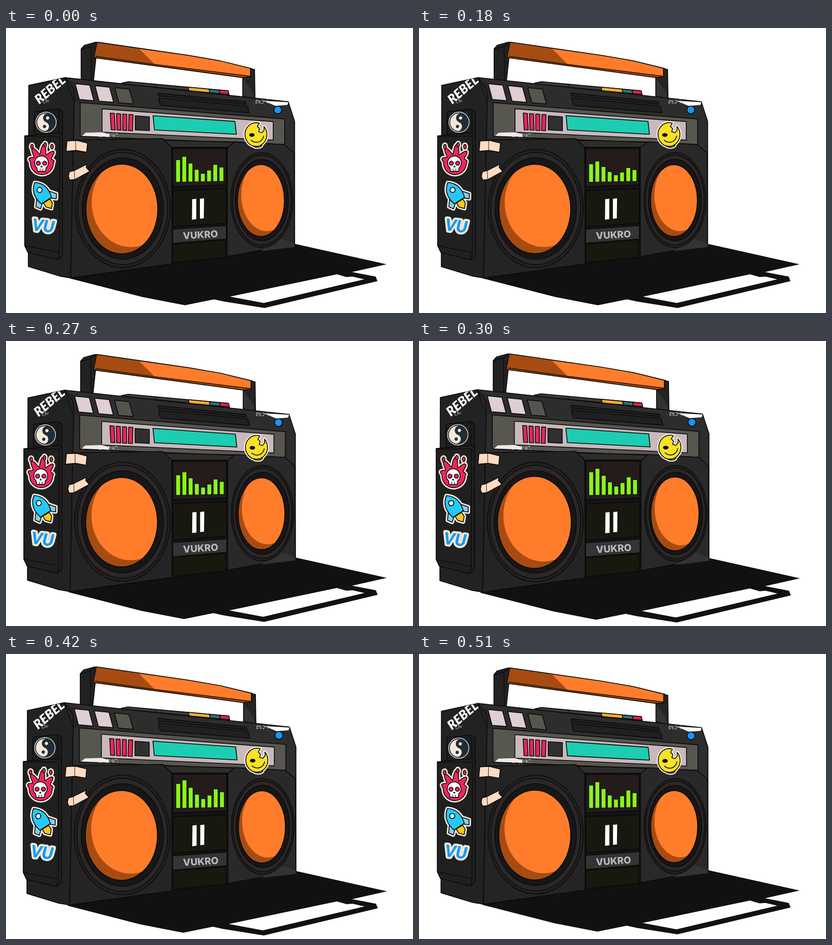
An HTML page with a canvas that plays this animation: 894x626 px, repeating every 540 ms.

```html
<!DOCTYPE html>
<html lang="en">
<head>
<meta charset="utf-8">
<title>Boombox</title>
<style>
html, body { margin: 0; width: 100%; height: 100%; overflow: hidden; background: #fff; }
canvas { display: block; }
</style>
</head>
<body>
<canvas id="stage" width="894" height="626"></canvas>
<script>
const ctx = document.getElementById('stage').getContext('2d');
const LOOP = 540, STEP = 30, TAU = Math.PI * 2;
const INK = '#0b0b0b', CREAM = '#f3e8d8', ORANGE = '#ff7c2b', RUST = '#a64c12', PINK = '#e7265a', TAPE = '#fddcc3';

// Motion: bell-shaped pulses over the loop.
const bell = (t, peak, width) => Math.exp(-(((t - peak) / width) ** 2));
const beat = t => bell(t, 345, t < 345 ? 80 : 125);
const conePulse = t => 1 - .015 * bell(t, 330, 110) + .03 * bell(t, 300, 20);
const barLevel = t => 1 + .13 * beat(t) - .28 * bell(t, 220, 65);

function paint(fill, stroke, width) {
  if (fill) { ctx.fillStyle = fill; ctx.fill(); }
  if (stroke) { ctx.strokeStyle = stroke; ctx.lineWidth = width; ctx.stroke(); }
}

function trace(p, close = true) {
  ctx.beginPath();
  for (let i = 0; i < p.length; i += 2) ctx.lineTo(p[i], p[i + 1]);
  if (close) ctx.closePath();
}

function poly(p, fill, stroke = INK, width = 1.8) {
  trace(p);
  paint(fill, stroke, width);
}

function line(p, width = 1.5) {
  trace(p, false);
  paint(null, INK, width);
}

function oval(x, y, rx, ry, fill, stroke, width = 1.8) {
  ctx.beginPath();
  ctx.ellipse(x, y, rx, ry, 0, 0, TAU);
  paint(fill, stroke, width);
}

function local(x, y, angle, draw, scale = 1) {
  ctx.save();
  ctx.translate(x, y);
  ctx.rotate(angle);
  ctx.scale(scale, scale);
  draw();
  ctx.restore();
}

function scaledAbout(x, y, scale, draw) {
  local(x, y, 0, () => { ctx.translate(-x, -y); draw(); }, scale);
}

function speckle(x, y, w, h, count, seed) {
  const rnd = () => (seed = seed * 16807 % 2147483647) / 2147483647;
  ctx.fillStyle = '#eee';
  for (let i = 0; i < count; i++) ctx.fillRect(x + rnd() * w, y + rnd() * h, 1.3, 1.3);
}

// Panels whose edges converge towards a horizon; y is measured at x = 365.
const perspective = (horizon, depth) => (x, y) => horizon + (y - horizon) * (1 - (x - 365) / depth);
const upper = perspective(312, 1650), centre = perspective(262, 2600);

function plate(view, x0, x1, y0, y1, fill, lean = 0, width = 1.8) {
  const [a, b] = [x0 + lean, x1 + lean];
  poly([x0, view(x0, y0), x1, view(x1, y0), b, view(b, y1), a, view(a, y1)], fill, INK, width);
}

function shadow() {
  poly([140, 550, 300, 591, 393, 609, 457, 596, 480, 601, 568, 615, 816, 556, 812, 546,
    760, 536, 836, 519, 634, 474, 365, 500], '#111', null);
  poly([492, 590, 727, 541, 748, 547, 761, 546, 787, 552, 566, 604], '#fff', null);
}

function handle() {
  poly([165, 46, 172, 38, 197, 31, 201, 34, 192, 118, 165, 113], '#222');
  line([165, 47, 187, 40, 197, 32]);
  line([187, 40, 188, 116]);
  poly([200, 31, 400, 60, 470, 72, 540, 89, 537, 108, 520, 109, 193, 65], RUST);
  poly([293, 46, 400, 61, 470, 73, 538, 90, 536, 105, 326, 79], ORANGE, null);
  line([197, 62, 326, 80, 537, 106]);
  poly([537, 90, 546, 91, 547, 156, 520, 150, 520, 109, 537, 108], '#242424');
  poly([521, 112, 540, 137, 546, 154, 521, 149], '#333', null);
}

function topKeys() {
  const rail = x => 118 + .091 * (x - 269);
  const key = (x0, x1, fill) => poly([x0, rail(x0), x1, rail(x1), x1 + 2, rail(x1) + 8, x0 + 2, rail(x0) + 8], fill);
  poly([253, 128, 254, 121, 269, 118, 488, 138, 490, 149], '#3b3b37');
  line([254, 122, 269, 124, 490, 146]);
  line([328, 124, 328, 131]);
  key(400, 446, '#efac32');
  key(446, 468, '#2f716f');
  key(468, 488, '#e51d50');
}

function shell() {
  poly([50, 126, 130, 109, 150, 162, 142, 549, 118, 545, 49, 524], '#222');
  poly([130, 109, 620, 162, 634, 205, 634, 475, 365, 518, 142, 549, 150, 162], '#2d2d2d');
  poly([131, 110, 150, 121, 162, 164, 150, 162], '#252525', null);
  line([130, 109, 149, 134, 150, 162]);

  poly([62, 184, 116, 178, 124, 184, 124, 238, 62, 240], '#1d1d1d');
  line([116, 178, 117, 232]);
  poly([41, 237, 117, 230, 124, 236, 124, 500, 114, 509, 48, 493, 41, 478], '#202020');
  line([41, 238, 118, 238, 117, 493, 41, 478]);
  line([117, 493, 114, 509]);
}

function tuner() {
  for (let i = 0; i < 3; i++) {
    const x = 152 + 43.5 * i;
    plate(upper, x, x + 32, 144, 174, i < 2 ? '#dfced2' : '#55554d', 9);
  }
  plate(upper, 334, 526, 146, 152, '#1f1f1f', 1);
  plate(upper, 335, 530, 156, 172, '#202020', 4);
  plate(upper, 163, 612, 180, 246, '#575750');
  plate(upper, 211, 587, 189, 236, '#c8b9bd');
  for (let i = 0; i < 4; i++) {
    const x = 229 + 13.7 * i;
    plate(upper, x, x + 9, 196.5, 230, PINK, 2 - i);
  }
  plate(upper, 284, 315, 198.5, 228, '#303030');
  plate(upper, 323, 503, 195.5, 226, '#1dcdb1', 3);
  oval(597, 180, 8.5, 8.5, '#1696fa', INK);

  poly([167, 237, 175, 230, 212, 229, 228, 234, 226, 239], '#efe9ea', null);
  poly([566, 160, 620, 163, 618, 169, 592, 171], '#fff', null);
  speckle(205, 231, 40, 8, 45, 17);
  speckle(212, 243, 18, 9, 14, 31);
  speckle(548, 157, 30, 8, 35, 53);
}

function frontPanels() {
  poly([148, 246, 344, 243, 364, 262, 365, 518, 142, 549], '#242424');
  line([344, 243, 350, 247, 500, 250, 611, 256]);
  poly([365, 262, 486, 262, 486, 503, 365, 518], '#151515');
  poly([486, 263, 502, 250, 611, 256, 633, 275, 634, 475, 486, 502], '#292929');
  poly([601, 462, 634, 474, 634, 481, 560, 490], '#333', null);
}

function speaker(x, y, rx, ry, pulse) {
  const ring = (k, fill) => oval(x + 2, y - 1, rx * k, ry * k, fill, INK);
  ring(1.32, '#222');
  ring(1.25, '#2d2627');
  ring(1.13, '#171717');
  scaledAbout(x, y, pulse, () => {
    oval(x, y, rx, ry, RUST);
    ctx.save();
    ctx.clip();
    oval(x + rx * .25, y - ry * .15, rx * 1.09, ry, ORANGE);
    ctx.restore();
    oval(x, y, rx, ry, null, INK, 2);
  });
}

function deck(level) {
  plate(centre, 366, 484, 264, 349, '#241b1b', 0, 2.5);
  [48, 55, 40, 26, 17, 24, 36, 30].forEach((height, i) => {
    ctx.beginPath();
    ctx.rect(373.7 + i * 13.6, 338 - i * .25 - height * level, 8.6, height * level);
    paint(null, INK, 2);
    paint('#8af51d');
  });
  plate(centre, 366, 484, 357, 437, '#181810', 0, 2.5);
  poly([409, 376, 418, 375, 418, 420, 408.5, 421], '#fff', null);
  poly([426, 375, 435, 374, 434.5, 418, 426, 419], '#fff', null);
  plate(centre, 366, 484, 442, 473, '#343434');
  plate(centre, 366, 482, 475, 515, '#18180f');
  local(389, 464, -.06, () => {
    ctx.font = '800 21px Inter, sans-serif';
    ctx.fillStyle = '#b8b8b8';
    ctx.fillText('VUKRO', 0, 0);
  });
}

function tapes() {
  poly([134, 248, 155, 247, 179, 253, 177, 273, 154, 269, 132, 271], TAPE);
  line([153, 248, 153, 269], 1);
  poly([139, 316, 150, 313, 178, 299, 176, 306, 184, 315, 151, 333, 140, 334, 137, 326], TAPE);
  line([150, 313, 151, 333], 1);
}

// Layers are [path, fill] pairs over one shared cream border.
function sticker(layers, border = 8) {
  ctx.lineJoin = 'round';
  ctx.strokeStyle = CREAM;
  ctx.lineWidth = border;
  layers.forEach(([path]) => ctx.stroke(path));
  ctx.strokeStyle = INK;
  ctx.lineWidth = 1.8;
  layers.forEach(([path, fill]) => {
    ctx.fillStyle = fill;
    ctx.fill(path);
    ctx.stroke(path);
  });
}

function yinYang() {
  const dark = '#1f2c39', quarter = Math.PI / 2;
  local(88, 207, .35, () => {
    oval(0, 0, 23, 23, CREAM);
    oval(0, 0, 20.5, 20.5, CREAM, dark, 2);
    ctx.beginPath();
    ctx.arc(0, 0, 20, -quarter, quarter);
    ctx.arc(0, 10, 10, quarter, -quarter, true);
    ctx.arc(0, -10, 10, quarter, -quarter);
    paint(dark);
    oval(0, -10, 3.5, 3.5, CREAM);
    oval(0, 10, 3.5, 3.5, dark);
  });
}

function flamingSkull() {
  const flame = new Path2D(), skull = new Path2D();
  for (let a = 0; a < TAU; a += TAU / 90) {
    const lift = Math.max(0, -Math.sin(a));
    const r = 25 + lift * (6 + 11 * Math.cos(9 * a + .6));
    flame.lineTo(r * Math.cos(a), r * Math.sin(a));
  }
  flame.closePath();
  const sparks = [-22, 7, 22].map(x => {
    const spark = new Path2D();
    spark.ellipse(x, -42 + Math.abs(x) / 4, 3, 5, 0, 0, TAU);
    return [spark, PINK];
  });
  skull.arc(-1, -1, 15, 2.3, .85);
  skull.lineTo(8, 18);
  skull.lineTo(-10, 18);
  skull.closePath();
  local(79, 297, 0, () => {
    sticker([[flame, '#f0255c'], ...sparks]);
    ctx.fillStyle = '#fff';
    ctx.fill(skull);
    ctx.stroke(skull);
    for (const side of [-1, 1]) {
      oval(-1 + side * 7, 0, 4.5, 4.5, PINK, INK);
      line([-1 + side * 3, 12, -1 + side * 3, 18], 1.2);
    }
    poly([-1, 5, 2, 9, -4, 9], INK, null);
  });
}

function rocket() {
  const hull = new Path2D('M0-32Q22-16 13 14L-13 14Q-22-16 0-32Z');
  const fins = new Path2D('M-14-2L-26 13L-20 22L-9 13ZM14-2L26 13L20 22L9 13Z');
  const fire = new Path2D('M-8 15L8 15L8 25L0 34L-8 25Z');
  local(81, 367, -.57, () => {
    sticker([[fins, '#83cce9'], [fire, '#ffc619'], [hull, '#24c9fb']]);
    oval(0, -13, 5.5, 5.5, '#d5f5ff', INK);
  }, 1.03);
}

function lettering() {
  ctx.save();
  trace([50, 126, 130, 109, 150, 162, 142, 200, 50, 200]);
  ctx.clip();
  local(73, 168, -.7, () => {
    ctx.font = 'italic 900 28px Lato, sans-serif';
    ctx.fillStyle = '#fff';
    ctx.fillText('REBEL', 0, 0);
  });
  ctx.restore();
  speckle(78, 152, 16, 13, 20, 71);

  local(56, 444, .13, () => {
    ctx.font = 'italic 900 36px Lato, sans-serif';
    ctx.lineJoin = 'round';
    ctx.strokeStyle = CREAM;
    ctx.lineWidth = 9;
    ctx.strokeText('VU', 0, 0);
    ctx.fillStyle = '#149bf5';
    ctx.fillText('VU', 0, 0);
  });
}

function smiley() {
  const face = new Path2D(), drip = new Path2D();
  face.ellipse(0, 0, 24, 26, 0, -.75, Math.PI * 1.6);
  for (const [x, y] of [[3, -18], [8, -13], [6, -6], [13, -4], [18, -10]]) face.lineTo(x, y);
  face.closePath();
  drip.ellipse(3, 23, 10, 5, 0, 0, TAU);
  local(549, 234, 0, () => {
    sticker([[drip, '#f6d51c'], [face, '#fae125']], 7);
    oval(-9, 1, 6, 4, INK);
    ctx.beginPath();
    ctx.arc(1, 1, 16, .1, 2.4);
    paint(null, INK, 1.8);
  });
}

function render(t) {
  const grow = 1 + .0146 * beat(t), pulse = conePulse(t);
  ctx.fillStyle = '#fff';
  ctx.fillRect(0, 0, 894, 626);
  ctx.lineJoin = 'round';
  scaledAbout(740, 300, grow, shadow);
  scaledAbout(353, 310, grow, () => {
    handle();
    topKeys();
    shell();
    tuner();
    frontPanels();
    speaker(254.5, 397.5, 79, 98.5, pulse);
    speaker(560, 379, 51.5, 79, pulse);
    deck(barLevel(t));
    tapes();
    lettering();
    yinYang();
    flamingSkull();
    rocket();
    smiley();
  });
}

function tick() {
  render(Math.floor(performance.now() % LOOP / STEP) * STEP);
  requestAnimationFrame(tick);
}
tick();
</script>
</body>
</html>
```
